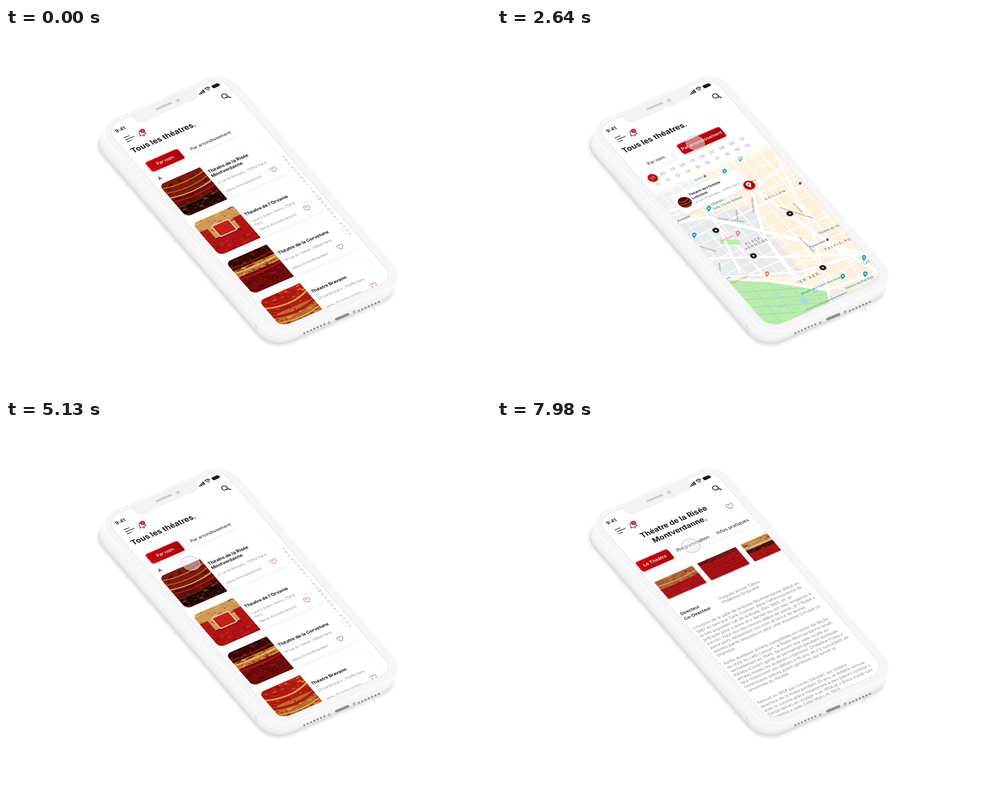
Recreate the animation shown at these times as an HTML page. Size 800x600 px, loop 8000 ms.

```html
<!DOCTYPE html>
<html lang="fr">
<head>
<meta charset="utf-8">
<title>Théatres</title>
<style>
  html, body { margin: 0; width: 100%; height: 100%; overflow: hidden; background: #fff; }
  svg { display: block; }
  text { font-family: Inter, "Open Sans", sans-serif; }
  .soft { filter: drop-shadow(0 3px 5px rgba(60, 60, 80, .08)); }
  .glow { filter: drop-shadow(1px 4px 4px rgba(190, 10, 20, .22)); }
</style>
</head>
<body>
<svg id="stage" width="800" height="600" viewBox="0 0 800 600"></svg>
<script>
const AXES = '.507 -.2205 .351 .407';
const PLANE = `matrix(${AXES} 164.2 164.3)`;
const RED = '#b9060c', INK = '#17171b', GREY = '#8f8f93';
const LOOP = 8000;

let seed = 7;
const rnd = () => (seed = seed * 16807 % 2147483647) / 2147483647;
const between = (a, b) => (a + (b - a) * rnd()).toFixed(1);
const times = (n, fn) => Array.from({ length: n }, (_, i) => fn(i)).join('');

const text = (x, y, s, size, fill = INK, weight = 400, more = '') =>
  `<text x="${x}" y="${y}" font-size="${size}" fill="${fill}" font-weight="${weight}" ${more}>${s}</text>`;
const rect = (x, y, w, h, r, fill, more = '') =>
  `<rect x="${x}" y="${y}" width="${w}" height="${h}" rx="${r}" fill="${fill}" ${more}/>`;
const line = (d, color, width, more = '') =>
  `<path d="${d}" fill="none" stroke="${color}" stroke-width="${width}" ${more}/>`;
const dot = (x, y, r, fill, more = '') => `<circle cx="${x}" cy="${y}" r="${r}" fill="${fill}" ${more}/>`;
const heart = (x, y, k = 1) => `<path transform="translate(${x} ${y}) scale(${k})" fill="none" stroke="#c0354c"
  stroke-width="1.3" d="M0 8C-12 0-10-9-4.500-8-1.500-7.500 0-5 0-3.500 0-5 1.500-7.500 4.500-8 10-9 12 0 0 8Z"/>`;
const mid = 'text-anchor="middle"';

// A tab button around its centre; active ones are red.
const tab = (cx, cy, w, s, size, active) =>
  rect(cx - w / 2, cy - 19, w, 38, 7, active ? 'url(#red)' : '#fff', `class="${active ? 'glow' : 'soft'}"`) +
  text(cx, cy + 5, s, size, active ? '#fff' : '#3a3a40', 500, mid);

// Blurry impression of a theatre hall: bands [top, height, base, dab colours], then arcs [y, sag, colour, width].
function hall(x, y, w, h, bands, arcs = [], extra = '', round = false) {
  const layers = bands.map(([top, height, base, dabs]) => rect(0, top, 125, height, 0, base) +
    times(60, i => `<ellipse cx="${between(0, 125)}" cy="${between(top, top + height)}" rx="${between(1.5, 7)}"
      ry="${between(.8, 3)}" fill="${dabs[i % dabs.length]}" opacity=".8"/>`)).join('');
  const curves = arcs.map(([cy, sag, color, width]) =>
    line(`M-5 ${cy}Q62 ${cy + sag} 130 ${cy}`, color, width)).join('');
  return `<svg x="${x}" y="${y}" width="${w}" height="${h}" viewBox="0 0 125 125" preserveAspectRatio="none">
    <g ${round ? 'clip-path="url(#round)"' : ''}>${layers}${curves}${extra}</g></svg>`;
}

const GOLD = ['#c8862f', '#8d2a12', '#e3b565', '#6d1409'];
const SEATS = ['#c01a1c', '#7c0c0e', '#a81216', '#c9251f'];
const DARK = ['#5a0d0a', '#220706', '#8f1712', '#7a2a12'];

const halls = [
  [[[0, 52, '#7d1a0e', DARK], [52, 38, '#5c0d0b', DARK], [90, 35, '#240907', ['#3d0f09', '#120403', '#8a4a1c']]],
    [[14, 18, '#c9822f', 3], [32, 20, '#b56a26', 3], [50, 18, '#e0a04a', 4], [66, 14, '#a8161a', 5]]],
  [[[0, 70, '#cf9a58', ['#a83018', '#e8c890', '#b3541f', '#d9a55c']], [70, 55, '#b01214', SEATS]], [[72, 5, '#7a0d0c', 4]],
    rect(0, 34, 24, 42, 2, '#ad1a15') + rect(100, 34, 25, 42, 2, '#ad1a15') +
    rect(38, 32, 50, 40, 3, '#c3201c', 'stroke="#efd9a8" stroke-width="3"')],
  [[[0, 36, '#300807', DARK], [36, 24, '#c07a32', GOLD], [60, 65, '#6f0a0c', ['#a01114', '#3a0606', '#8b0e10']]],
    [[24, 10, '#8f1712', 4], [44, 6, '#eec070', 4], [66, 8, '#b3151a', 5]]],
  [[[0, 60, '#b01a12', ['#d88f35', '#8c0f0c', '#c4291b']], [60, 65, '#bd6a28', ['#b01a14', '#e5b65c', '#8d1a0f']]],
    [[28, 30, '#e0a145', 5], [62, 26, '#b01713', 8], [86, 22, '#e6bd6b', 3]]],
];

const cards = [
  [['Théatre de la Risée', 'Montverdanne'], ['4 rue Ondrevelle , 75002 Paris'], '2eme'],
  [["Théatre de l'Orvanie"], ['1 place Aubin Terlon, 75018', 'Paris'], '18eme'],
  [['Théatre de la Corvelune'], ['19 rue de Valpré, 75008 Paris'], '8eme'],
  [['Théatre Bravano'], ['23 rue Bravano , 75009 Paris'], '9eme'],
];

const card = ([names, address, district], i) => {
  const [bands, arcs, extra] = halls[i];
  return `<g transform="translate(20 ${238 + i * 156.5})">` +
    rect(-11, 0, 341, 129, 18, '#fff', 'class="soft"') + hall(-11, -1, 134, 130, bands, arcs, extra, true) +
    names.map((s, n) => text(132, (names.length > 1 ? 29 : 45) + n * 16.5, s, 14, INK, 700)).join('') +
    address.map((s, n) => text(133, 73 + n * 14, s, 11, GREY)).join('') +
    text(135, 108, district + ' Arrondissement', 11, GREY) + heart(293, 101) + '</g>';
};

const listView = () => text(14, 111, `Tous les théatres<tspan fill="${RED}">.</tspan>`, 23.7, INK, 700) +
  tab(74, 172.5, 106, 'Par nom', 14, true) + tab(222, 172.5, 140, 'Par arrondissement', 14, false) +
  text(20, 224, 'A', 15, INK, 500) + cards.map(card).join('') +
  [...'ABCDEFGHIJKLMOPQRSTUVXY'].map((c, i) => text(362, 317 + i * 14.2, c, 10, '#9a9a9e', 400, mid)).join('');

// Map pieces are placed in stage pixels; their labels lie in the screen plane.
const label = (x, y, s, size, fill, angle = 0, more = '') =>
  `<g transform="matrix(${AXES} ${x} ${y}) rotate(${angle})">${text(0, 0, s, size, fill, 500, more)}</g>`;
const poi = (x, y, color) => `<g transform="translate(${x} ${y})">` +
  `<path d="M-1 4L-4-1A3.700 3.700 0 1 1 3-1Z" fill="${color}"/>` + dot(-.5, -2, 1.3, '#fff') + '</g>';
const ring = (x, y) => `<g transform="matrix(${AXES} ${x} ${y})" class="soft">` + dot(0, 0, 9, '#0c0c0e') + dot(0, 0, 3, '#fff') + '</g>';

function streets() {
  const blue = '#2b8fb0', road = '#74777d', wide = 'letter-spacing="3"';
  const grid = `<g transform="${PLANE}">` + times(15, i => line(`M${i * 29 - 10} 255l${(i % 4) * 16 - 20} 560`, '#fff', i % 3 ? 2 : 4)) +
    times(17, i => line(`M0 ${268 + i * 30}l380 ${(i % 5) * 12 - 28}`, '#fff', i % 3 ? 2 : 4)) + '</g>';
  return rect(240, 170, 410, 330, 0, '#fcf1dd') +
    '<path d="M285 325L350 306 424 292 444 330 480 376 505 405 370 418Z" fill="#e8eaee"/>' +
    '<path d="M258 274L330 245 372 258 330 300 290 316Z" fill="#eff0f2"/>' + grid +
    '<path d="M368 348l31 1 2 8-32-1Z" fill="#b8eda6"/>' +
    ['M286 322L345 312 475 344 640 378', 'M416 259L472 300 545 352 625 400', 'M418 258L432 312 442 345 500 425',
      'M380 270L430 262 500 200', 'M272 305L420 262', 'M360 318L402 405', 'M330 380L470 377 625 372', 'M372 411L500 402 640 360',
      'M460 210L520 330 545 432'].map((d, i) => line(d, '#fff', i < 3 ? 5 : 3.5)).join('') +
    '<path d="M372 414L450 418 545 433 590 432 600 440 440 500Z" fill="#b9edae"/>' +
    '<g clip-path="url(#park)">' + times(7, i => line(`M${372 + i * 32} 405l72 90`, '#a3d9a0', 1) + line(`M360 ${438 + i * 13}l190-12 80-28`, '#a3d9a0', 1)) + '</g>' +
    '<path d="M545 433L590 432 640 402 650 440 560 455Z" fill="#eceef0"/>' +
    line('M372 413L450 417 545 432 632 400', '#fff', 4) + line('M541 412L553 465', '#fff', 4) +
    '<ellipse cx="506" cy="449" rx="7" ry="5" fill="#9fd8ef"/>' + line('M461 445l12-2M463 460l13-2M521 436l8-2', '#9fd8ef', 3) +
    label(443, 284, 'GAILLON', 11, road, 0, wide) + label(411, 358, 'PLACE', 11, road, 0, wide) +
    label(410, 366, 'VENDÔME', 11, road, 0, wide) + label(542, 367, 'PALAIS-RO', 11, road, 0, wide) +
    label(497, 422, '1ER ARR.', 13, road, 0, wide) +
    label(503, 440, 'Musée des Soies Anciennes', 10, blue) + label(576, 431, 'Galerie du Perchoir', 10, blue) +
    label(517, 363, 'Pyramides', 10, '#4466a8') + label(531, 341, 'Théâtre du Val', 10, blue) +
    label(606, 390, 'La Co', 10, blue) + label(415, 257, 'Opéra', 9, blue) + label(327, 252, 'Aubry', 9, blue) +
    label(354, 293, "L'Astrée", 10, blue) + label(358, 300, 'Salle Corvin Belmat', 10, blue) +
    label(297, 321, 'Mirabelle', 10, '#4466a8') + label(372, 418, 'Prune', 10, blue) + label(306, 346, 'Paris', 10, blue) +
    label(380, 425, 'Orangine Paris', 10, '#ee8054') + label(372, 352, 'uz Paris', 10, '#ee7fa0') +
    label(364, 315, 'Rue des Corbeilles', 8, road, 38) + label(466, 297, 'Avenue du Grand Lustre', 8, road, 52) +
    label(425, 304, 'Rue de la Noix', 8, road, -60) + label(398, 316, 'Rue Veline', 7, road, -60) +
    label(370, 406, 'Rue Cardine', 7, road, -60) + label(335, 361, 'Rue Ombrelle', 7, road, 52) +
    label(498, 346, 'Rue du Vieux Gant', 7, road, 85) + label(487, 289, 'Rue Tissade', 7, road, 85) +
    [[376, 238], [350, 299], [326, 343], [606, 380], [571, 411], [608, 407], [402, 217]].map(p => poi(...p, '#1d9fb8')).join('') +
    poi(398, 340, '#ee7fa0') + poi(446, 407, '#ee8054') +
    [[343, 244], [500, 256], [295, 322], [545, 349]].map(p => dot(...p, 2.4, '#4a68a8')).join('') +
    ring(483, 306) + ring(361, 333.5) + ring(423, 375.5) + ring(537.5, 395);
}

const mapView = () => rect(-2, 135, 380, 690, 0, '#fff') +
  `</g><g clip-path="url(#mapArea)">${streets()}</g><g transform="${PLANE}" clip-path="url(#screen)">` +
  rect(-2, 261, 380, 26, 0, 'url(#fade)') +
  tab(74, 172.5, 106, 'Par nom', 14, false) + tab(222, 172.5, 140, 'Par arrondissement', 14, true) +
  dot(30.5, 220, 14, RED, 'class="glow"') +
  times(20, i => text(30.5 + i % 10 * 32.2, i < 10 ? 224.5 : 250, String(i + 1).padStart(2, '0'), 13, i ? '#96969b' : '#fff', 400, mid)) +
  rect(30, 298, 215, 72, 13, '#fff', 'class="soft"') +
  dot(57, 333, 19, '#4a0d0a') + line('M42 326q15 8 30 0M39 335q18 9 36 0M43 345q14 6 28 0', '#b3452a', 3) +
  text(81, 321, 'Théatre des Grelots', 10.5, INK, 700) + text(81, 335, 'Lutéciens', 10.5, INK, 700) +
  text(82, 350, '4 rue Ondrevelle , 75002 Paris', 10, GREY) +
  dot(244, 365, 16, RED, 'class="glow"') + '<path d="M244 374l-6-9a7 7 0 1 1 12 0Z" fill="#fff"/>' + dot(244, 361.5, 2.5, RED) +
  rect(122, 804, 135, 4, 2, '#a9b3ab');

const story = [
  "L'histoire de la salle de la Risée-Montverdanne début en", "1867 en tant que Café-Concert dans l'effervescence de",
  'la très populaire rue de la Risée. Dès 1868, on se', 'précipite pour y boire et y danser au son des rengaines à',
  'succès. Haut lieu des revues début de siècle, la « Risée »', 'porte alors idéalement son nom et lance de jeunes',
  'artistes parmi lesquels on peut citer Anselme Corvadi ou', 'Orphidus.', '',
  'Après quelques années complétées en raison de déclin', 'du style du café-concert, la Risée-Montverdanne renaît',
  'véritablement en 1945, devenant une salle vouée au', "théâtre d'avant-garde se permettant pendant quelques",
  'années toutes les audaces créatrices. Ombeline Frasy y', "fera notamment ses débuts à 19 ans, et s'y succèdent de",
  'nombreuses pièces avant-gardistes qui feront la', 'renommée du théâtre.', '', '',
  'Rénové en 1958 par Lucien Varadec qui restera', 'directeur de la Risée pendant 35 ans, le théâtre renoue',
  'avec le succès grâce notamment à des pièces comme «', 'Treize dames en voyage » en 1958 et « Doux mardi-soir',
  'M. Vernal » avec Odile Marn en 1959.',
];

const detailView = () => rect(60, 76, 320, 30, 0, '#fff') + rect(-2, 84, 380, 735, 0, '#fff') +
  text(178, 113, 'Théatre de la Risée', 23, INK, 700, mid) +
  text(176, 143, `Montverdanne<tspan fill="${RED}">.</tspan>`, 23, INK, 700, mid) + heart(343, 131, 1.1) +
  '<g class="soft">' +
  hall(8, 258, 125, 69, [[0, 58, '#a8603a', GOLD], [58, 67, '#a81317', SEATS]], [[30, 20, '#e7c27d', 4], [56, 16, '#8c1611', 5]]) +
  hall(148, 258, 125, 69, [[0, 26, '#6a1a14', DARK], [26, 99, '#ab1118', SEATS]],
    Array.from({ length: 6 }, (_, i) => [35 + i * 16, -16, '#6e0a0d', 2.5])) +
  hall(289, 258, 125, 69, [[0, 48, '#c18b52', GOLD], [48, 24, '#38100b', DARK], [72, 53, '#a31518', SEATS]], [[34, 12, '#ecd6a8', 7]]) + '</g>' +
  text(6, 391, 'Directeur', 13.5, INK, 600) + text(5, 410, 'Co-Directeur', 13.5, INK, 600) +
  text(128, 395, 'Hugues Armel Tibou', 13.5, GREY) + text(128, 410, 'Philémon Drasveld', 13.5, GREY) +
  story.map((s, i) => text(7, 449 + i * 15.9, s, 13, '#8c8c90')).join('') +
  tab(179, 194, 116, 'Programmation', 14.5, false) +
  `<g id="infosTab">${tab(308, 194, 124, 'Infos pratiques', 14.5, false)}</g>` +
  `<g id="hallTab">${tab(55, 195, 104, 'Le Théâtre', 14.5, true)}</g>`;

const header = () => text(31, 30, '9:41', 15.5, INK, 600, mid) +
  line('M22 54h18M22 62h29M22 70h15', INK, 2) +
  '<g transform="translate(75 63)">' + line('M-10 6C-6 2-8-9 0-10 8-9 6 2 10 6ZM-3 9q3 3 6 0', '#2a2a35', 1.8) + '</g>' +
  dot(81, 57, 7, '#c4101c') + text(81, 60.5, '2', 9, '#fff', 600, mid) +
  dot(346, 59, 7.5, 'none', `stroke="${INK}" stroke-width="2.6"`) + line('M351.500 65l7 7', INK, 3) +
  times(4, i => rect(290 + i * 5, 20 - i * 2.6, 3.4, 4 + i * 2.6, .8, INK)) +
  line('M313 15q8-7 16 0M316 19q5-4 10 0', INK, 2.4) + dot(321, 22.5, 1.7, INK) +
  rect(335, 12, 22, 11, 3, INK) + rect(358, 15.5, 2, 4, 1, INK);

const DEPTH = 20;
const body = (fill, more = '') => rect(-24, -16, 427, 854, 64, fill, `transform="${PLANE}" ${more}`);
const layer = (depth, content, more = '') =>
  `<g transform="translate(${(-.45 * depth).toFixed(2)} ${depth})" ${more}>${content}</g>`;
const shell = () => layer(DEPTH, body('#d4d4d6'), 'style="filter:drop-shadow(0 2px 3px rgba(0,0,0,.18))"') +
  times(DEPTH, i => layer(DEPTH - 1 - i, body(i < 3 ? '#e6e6e8' : i < 8 ? '#f0f0f1' : '#f6f6f7'))) +
  body('#f6f6f7', 'stroke="#fcfcfc" stroke-width="4"') +
  line('M178 229l8 9M202 257l19 22M229 288l19 22', '#e0e0e2', 3, 'stroke-linecap="round"') +
  line('M411 487l4 14M606 459l3 8', '#e0e0e2', 2) +
  line('M492 503l34-15M582 466l34-15', '#8f8f92', 3.4, 'stroke-dasharray="0 6" stroke-linecap="round"') +
  line('M545 480l19-8', '#8d8d90', 4.5, 'stroke-linecap="round"') + dot(533, 486, 2.4, '#b5b5b8') + dot(574, 468, 2.4, '#b5b5b8') +
  `<g transform="${PLANE}">` + rect(-3, -3, 381, 819, 45, '#ececee') + rect(0, 0, 375, 813, 42, '#fff') + '</g>';

const notch = () => '<path d="M76-3q8 0 8 9 0 25 24 25h160q24 0 24-25 0-9 8-9Z" fill="#f3f3f4" stroke="#e8e8ea"/>' +
  rect(155, 8, 54, 7, 3.5, '#d5d5d7') + line('M158 9.500h48', '#b9b9bc', 1.5) + dot(227, 12, 7, '#e2e2e4') + dot(227, 12, 3.5, '#c4c4c8');

document.getElementById('stage').innerHTML = `
  <defs>
    <clipPath id="screen"><rect width="375" height="813" rx="42"/></clipPath>
    <clipPath id="mapArea"><path transform="${PLANE}" d="M0 262H375V771a42 42 0 0 1-42 42H42a42 42 0 0 1-42-42Z"/></clipPath>
    <clipPath id="park"><path d="M372 414L450 418 545 433 590 432 600 440 440 500Z"/></clipPath>
    <clipPath id="round"><rect width="160" height="125" rx="17"/></clipPath>
    <linearGradient id="red"><stop stop-color="#c40810"/><stop offset="1" stop-color="#a90509"/></linearGradient>
    <linearGradient id="fade" x2="0" y2="1"><stop stop-color="#fff"/><stop offset="1" stop-color="#fff" stop-opacity="0"/></linearGradient>
  </defs>
  ${shell()}
  <g transform="${PLANE}" clip-path="url(#screen)">${listView()}</g>
  <g id="map"><g transform="${PLANE}" clip-path="url(#screen)">${mapView()}</g></g>
  <g id="detail"><g transform="${PLANE}" clip-path="url(#screen)">${detailView()}</g></g>
  <g transform="${PLANE}">${header()}${notch()}</g>
  <g id="pointer">${dot(0, 0, 25, '#ececee', 'fill-opacity=".5" stroke="#c2c2c6" stroke-width="1.5"')}</g>`;

const [map, detail, infosTab, hallTab, pointer] =
  ['map', 'detail', 'infosTab', 'hallTab', 'pointer'].map(id => document.getElementById(id));

// Pointer stops: time, x, y
const stops = [[700, 345, 235], [1500, 327, 188], [2750, 327, 189.500], [3570, 285, 209], [3950, 266, 217], [4400, 266, 217],
  [5130, 305, 236], [5600, 322, 254], [6200, 325, 256], [7000, 342, 300], [7250, 340, 288], [7600, 297, 256], [7950, 320, 207]];

const ease = (t, from, to) => {
  const k = Math.min(1, Math.max(0, (t - from) / (to - from)));
  return k * k * (3 - 2 * k);
};

function pointerAt(t) {
  let [, x, y] = stops[0];
  for (let i = 1; i < stops.length; i++) {
    const k = ease(t, stops[i - 1][0], stops[i][0]);
    x += (stops[i][1] - stops[i - 1][1]) * k;
    y += (stops[i][2] - stops[i - 1][2]) * k;
  }
  return [x, y];
}

const show = (el, opacity) => {
  el.style.opacity = opacity;
  el.style.visibility = opacity ? 'visible' : 'hidden';
};

function draw(now) {
  const t = now % LOOP;
  show(map, ease(t, 1980, 2440) - ease(t, 4200, 4660));
  show(detail, ease(t, 5700, 6080));
  const away = 1 - ease(t, 5970, 6770);
  infosTab.setAttribute('transform', `translate(${-87 * away} ${-21 * away})`);
  hallTab.setAttribute('transform', `translate(${19 * away} ${-23 * away})`);
  show(pointer, ease(t, 750, 1050));
  pointer.setAttribute('transform', `matrix(${AXES} ${pointerAt(t).join(' ')})`);
  requestAnimationFrame(draw);
}
draw(performance.now());
</script>
</body>
</html>
```
